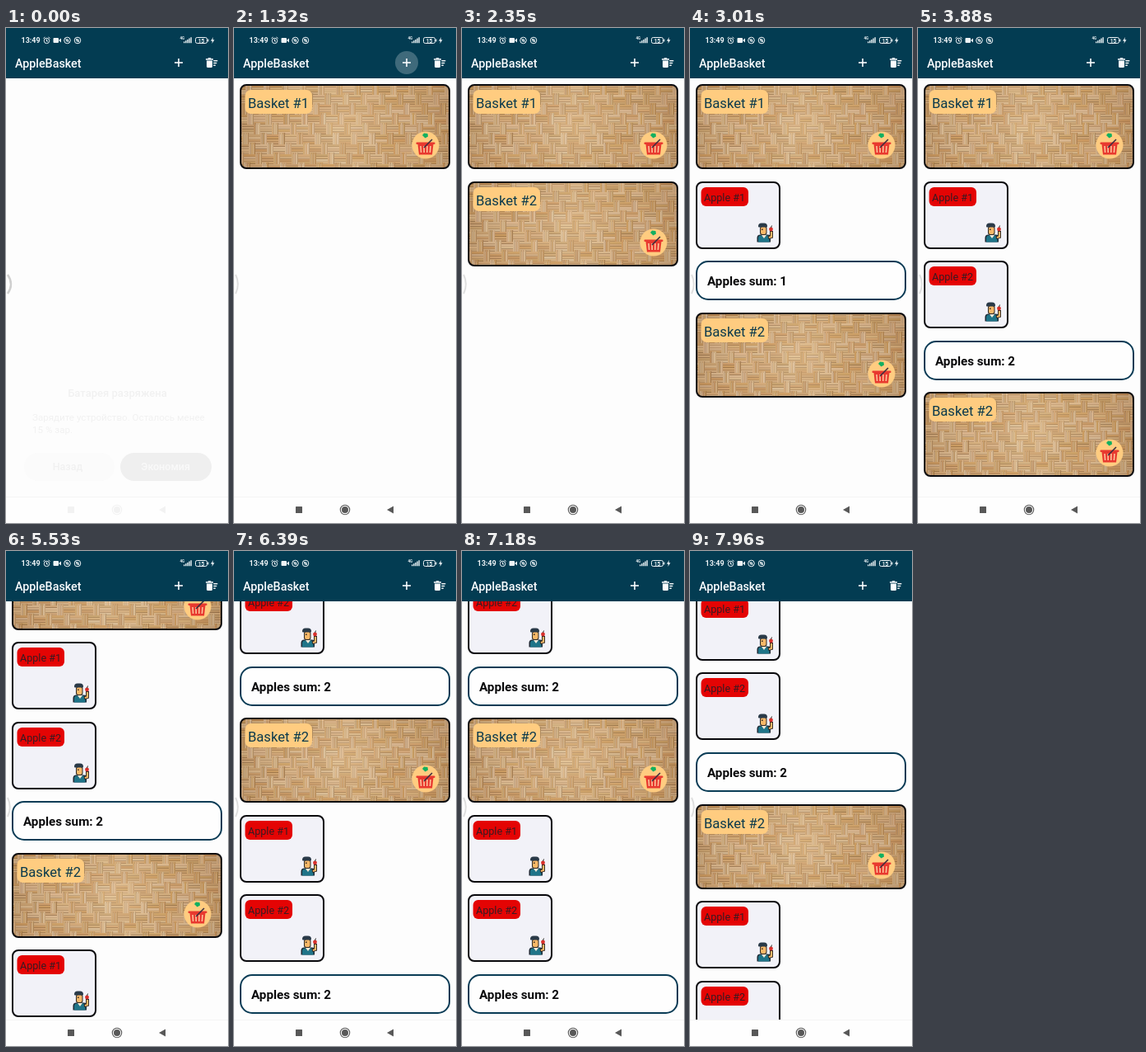
Write an HTML page with a canvas that moves like this. It is 270 by 600 pixels and loops after 8 s.

```html
<!DOCTYPE html>
<html lang="en">
<head>
<meta charset="utf-8">
<title>AppleBasket</title>
<style>
html, body { margin: 0; width: 100%; height: 100%; overflow: hidden; background: #fdfdfd; }
canvas { display: block; width: 270px; height: 600px; }
</style>
</head>
<body>
<canvas id="stage" width="270" height="600"></canvas>
<script>
const LOOP = 8000, BG = '#fdfdfd', BLUE = '#033c52', INK = '#0b3a4c', PEACH = '#ffcc80', BLACK = '#08080c';
const ctx = document.getElementById('stage').getContext('2d');

// Taps: 'b' adds a basket, a number adds an apple to that basket
const TAPS = [[1180, 'b'], [1900, 'b'], [2650, 0], [3480, 0], [4300, 1], [4850, 1]];
const SCROLL = [[0, 0], [5270, 0], [5530, 75], [6300, 239], [7560, 239], [7960, 135], [8000, 123]];
const STEP = { basket: 117.5, apple: 96.6, sum: 62.5 };

const clamp = v => Math.max(0, Math.min(1, v));
const ease = v => v * v * (3 - 2 * v);

function along(points, t) {
  const i = Math.max(1, points.findIndex(p => p[0] >= t));
  const [t0, a] = points[i - 1], [t1, b] = points[i];
  return a + (b - a) * clamp((t - t0) / (t1 - t0));
}

function box(x, y, w, h, r, fill, stroke, width = 2) {
  ctx.beginPath();
  ctx.roundRect(x, y, w, h, r);
  if (fill) { ctx.fillStyle = fill; ctx.fill(); }
  if (stroke) { ctx.strokeStyle = stroke; ctx.lineWidth = width; ctx.stroke(); }
}

function dot(x, y, r, fill) {
  ctx.beginPath();
  ctx.arc(x, y, r, 0, 7);
  ctx.fillStyle = fill;
  ctx.fill();
}

function ring(x, y, r, color, width = 1) {
  ctx.beginPath();
  ctx.arc(x, y, r, 0, 7);
  ctx.strokeStyle = color;
  ctx.lineWidth = width;
  ctx.stroke();
}

function trace(p) {
  ctx.beginPath();
  for (let i = 0; i < p.length; i += 2) ctx.lineTo(p[i], p[i + 1]);
}

function poly(fill, ...p) {
  trace(p);
  ctx.fillStyle = fill;
  ctx.fill();
}

function line(color, width, ...p) {
  trace(p);
  ctx.strokeStyle = color;
  ctx.lineWidth = width;
  ctx.stroke();
}

function text(s, x, y, size, color, weight = 400, align = 'left') {
  ctx.font = `${weight} ${size}px Roboto, sans-serif`;
  ctx.textAlign = align;
  ctx.fillStyle = color;
  ctx.fillText(s, x, y);
}

// Woven bamboo: shifted rows of horizontal and vertical slats
const weave = (() => {
  const c = document.createElement('canvas');
  c.width = 254; c.height = 101;
  const g = c.getContext('2d');
  let seed = 11;
  const rnd = () => (seed = seed * 16807 % 2147483647) / 2147483647;
  const slat = (x, y, w, h) => {
    g.fillStyle = `hsl(${30 + rnd() * 5} ${40 + rnd() * 10}% ${56 + rnd() * 15}%)`;
    g.fillRect(x, y, w, h);
    g.fillStyle = `rgba(80,50,25,${0.1 + rnd() * 0.4})`;
    if (w > h) g.fillRect(x, y + h - 0.8, w, 0.8);
    else g.fillRect(x + w - 0.8, y, 0.8, h);
  };
  for (let row = 0; row < 9; row++) {
    for (let x = -30 + row * 8 % 22; x < 260; x += 22) {
      for (let k = 0; k < 4; k++) slat(x, row * 12 + k * 3, 14, 3);
      for (let k = 0; k < 3; k++) slat(x + 14 + k * 2.7, row * 12 - 2, 2.7, 14);
    }
  }
  const light = g.createRadialGradient(125, 50, 10, 125, 50, 140);
  light.addColorStop(0, 'rgba(245,215,170,.35)');
  light.addColorStop(0.5, 'rgba(225,185,130,.12)');
  light.addColorStop(1, 'rgba(130,85,45,.26)');
  g.fillStyle = light;
  g.fillRect(0, 0, 254, 101);
  return c;
})();

const draw = {
  basket(n) {
    ctx.save();
    ctx.beginPath();
    ctx.roundRect(8, 1, 254, 101, 7);
    ctx.clip();
    ctx.drawImage(weave, 8, 1);
    ctx.restore();
    box(8, 1, 254, 101, 7, null, BLACK);
    box(13.5, 7, 81.5, 29, 7, PEACH);
    text('Basket #' + n, 17, 28.5, 16.6, INK);
    dot(233, 74, 16.5, PEACH);
    poly('#12b060', 229, 62, 231, 59.5, 235.5, 60, 236, 63.5, 232.5, 65.5);
    poly('#e8392f', 223.5, 73, 242.5, 73, 241, 85.5, 225, 85.5);
    box(221.5, 70.5, 23, 2.6, 1, '#e8392f');
    for (let x = 227; x < 242; x += 4) line('#ffc9a0', 1.5, x, 75, x + (233 - x) * 0.1, 83);
    line('#3c3040', 1.6, 231, 77, 241, 67);
  },
  apple(n) {
    box(8, 1, 101, 80, 7, '#f2f2f8', BLACK);
    box(13.5, 7, 57.5, 23, 6, '#e40404');
    text('Apple #' + n, 17, 23.7, 12.6, '#3a1a22');
    ctx.save();
    ctx.translate(81, 50);
    box(0.5, 14.5, 16.5, 9, [4, 3, 0, 0], '#1c2834');
    box(2, 15.5, 13.5, 8, [3, 2, 0, 0], '#1f7488');
    poly('#f4ead8', 6, 15, 12, 15, 9, 19);
    box(4, 4, 8.5, 11, 3, '#2a2622');
    box(5, 5, 6.5, 9, 2, '#f8b868');
    box(2, 0.5, 11, 5, [4, 4, 1, 1], '#2a3a48');
    box(6, 7.5, 1.5, 1.5, 0, '#2a2622');
    line('#2a2622', 4, 14, 18, 18, 17, 18, 10);
    line('#f8b868', 2.2, 15, 18, 18, 17, 18, 11);
    dot(17.5, 8, 2.4, '#d8302c');
    line('#2a2622', 1, 17.5, 6, 18.5, 3.5);
    ctx.restore();
  },
  sum(n) {
    box(8, 1, 254, 46, 14, '#fefefe', '#0a3c56');
    text('Apples sum: ' + n, 21, 30, 15.2, '#08080a', 700);
  }
};

// Places of all cards after the first n taps
function layout(n) {
  const baskets = [], items = new Map();
  for (const [, what] of TAPS.slice(0, n)) what === 'b' ? baskets.push(0) : baskets[what]++;
  let y = 68;
  const add = (kind, b, label) => {
    items.set(kind + b + (kind === 'apple' ? '-' + label : ''), { kind, label, y });
    y += STEP[kind];
  };
  baskets.forEach((count, b) => {
    add('basket', b, b + 1);
    for (let a = 1; a <= count; a++) add('apple', b, a);
    if (count) add('sum', b, count);
  });
  return items;
}

function list(t) {
  const n = TAPS.filter(e => e[0] <= t).length;
  if (!n) return;
  const age = t - TAPS[n - 1][0], before = layout(n - 1), top = along(SCROLL, t);
  ctx.save();
  ctx.beginPath();
  ctx.rect(0, 61, 270, 507);
  ctx.clip();
  for (const [id, { kind, label, y }] of layout(n)) {
    const old = before.get(id);
    const at = old ? old.y + (y - old.y) * ease(clamp(age / 200)) : y;
    ctx.save();
    ctx.globalAlpha = old ? 1 : clamp(age / 120);
    ctx.translate(0, Math.round(at - top));
    draw[kind](label);
    ctx.restore();
  }
  ctx.restore();
}

function statusBar() {
  const w = '#eef3f6';
  text('13:49', 18.5, 18, 9, w, 700);
  ring(49.5, 15.5, 3.2, w);
  line(w, 1, 49.5, 13.5, 49.5, 16, 51, 16);
  line(w, 1, 45.5, 12.5, 47.5, 11);
  line(w, 1, 51.5, 11, 53.5, 12.5);
  box(57.5, 12, 6.5, 6, 1, w);
  poly(w, 64, 15, 67, 12.5, 67, 17.5);
  for (const x of [74.5, 87]) {
    ring(x, 15, 3.8, w);
    ring(x, 15, 1.3, w);
    line(w, 1, x - 2.5, 12.5, x + 2.5, 17.5);
  }
  text('4G', 211.5, 14, 4.5, w, 700);
  for (let i = 0; i < 5; i++) box(216 + i * 2.1, 16.5 - i * 1.3, 1.4, 1.8 + i * 1.3, 0, w);
  box(230.5, 11.5, 14, 7, 2, null, w, 1);
  box(245.3, 13.5, 1.2, 3, 0, w);
  text('15', 237.5, 17.6, 6.5, w, 700, 'center');
  poly(w, 252, 11, 249, 15.7, 251, 15.7, 250.4, 19, 253.5, 14.3, 251.4, 14.3);
}

function header(t) {
  box(0, 0, 270, 61, 0, BLUE);
  statusBar();
  text('AppleBasket', 11, 48, 14.3, '#fcfdff', 500);
  for (const [at, what] of TAPS) {
    if (what !== 'b') continue;
    ctx.globalAlpha = 0.24 * clamp((t - at + 120) / 100) * clamp((at + 400 - t) / 200);
    dot(210, 42, 14, '#fff');
  }
  ctx.globalAlpha = 1;
  const w = '#fcfdff';
  line(w, 1.6, 205, 42, 215, 42);
  line(w, 1.6, 210, 37, 210, 47);
  box(244, 39.5, 7, 8.5, [0, 0, 1.5, 1.5], w);
  box(243, 37.2, 9, 1.5, 0, w);
  box(245.7, 36.2, 3.6, 1.5, 0, w);
  [5, 4, 2.5].forEach((len, i) => box(252.3, 39 + i * 2.8, len, 1.4, 0, w));
}

function navBar(t) {
  box(0, 568, 270, 32, 0, '#fefefe');
  box(0, 568, 270, 1, 0, '#f5f5f5');
  const c = t < 430 ? '#f2f2f2' : '#585858';
  box(75, 580, 8, 8, 0.5, c);
  ring(135, 584, 5.7, c, 1.1);
  dot(135, 584, 4, c);
  poly(c, 186, 584, 194, 579.5, 194, 588.5);
}

function fadingDialog(t) {
  ctx.globalAlpha = clamp((500 - t) / 90);
  const c = '#f1f1f1';
  text('Батарея разряжена', 135.5, 447, 13, c, 500, 'center');
  text('Зарядите устройство. Осталось менее', 32, 476, 11.6, c);
  text('15 % зар.', 32, 491, 11.6, c);
  box(22, 515, 110, 34, 17, '#fbfbfb');
  box(139, 515, 111, 34, 17, '#efefef');
  text('Назад', 75, 536, 12.5, c, 500, 'center');
  text('Экономия', 194, 536, 12.5, '#f9f9f9', 500, 'center');
  ctx.globalAlpha = 1;
}

function edgeHandle(t) {
  const early = t < 430;
  ctx.beginPath();
  ctx.moveTo(2, 299);
  ctx.quadraticCurveTo(early ? 10 : 7.5, 310.5, 2, 322);
  ctx.strokeStyle = early ? '#cfcfcf' : '#dedede';
  ctx.lineWidth = early ? 2.5 : 2;
  ctx.stroke();
}

function frame(now) {
  const t = now % LOOP;
  box(0, 0, 270, 600, 0, BG);
  fadingDialog(t);
  list(t);
  edgeHandle(t);
  header(t);
  navBar(t);
}

const start = performance.now();
(function tick() {
  frame(performance.now() - start);
  requestAnimationFrame(tick);
})();
</script>
</body>
</html>
```
